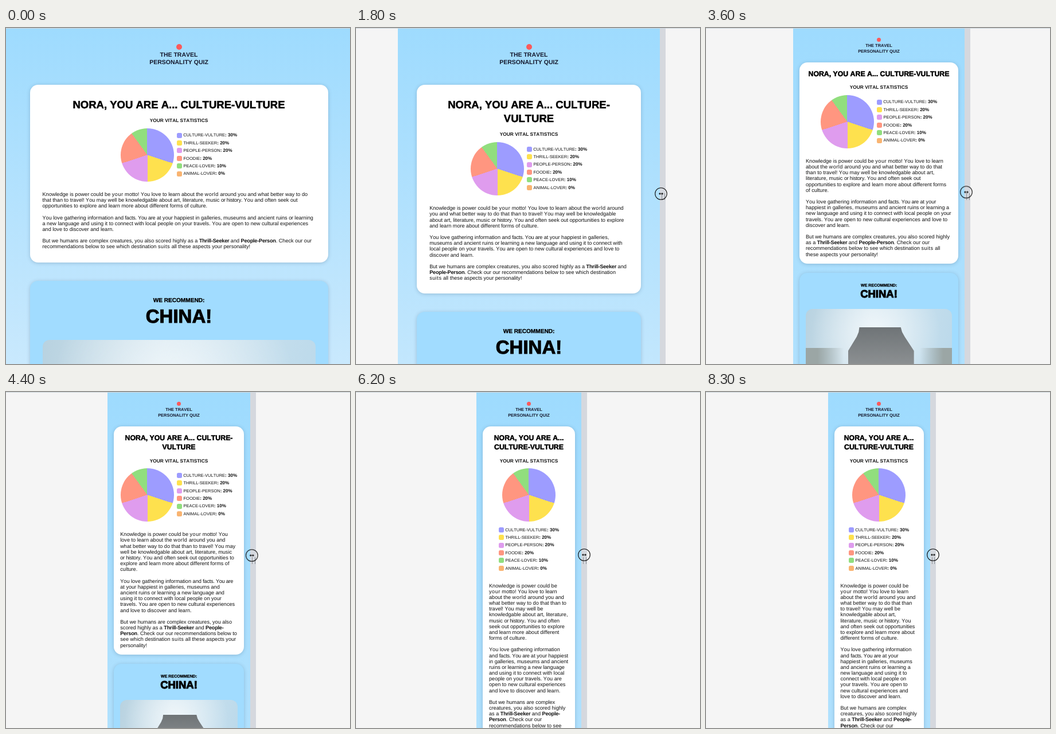
Write an HTML page that moves like this. It is 600 px wide and 586 px high and loops after 8.4 s.

```html
<!DOCTYPE html>
<html lang="en">
<head>
<meta charset="utf-8">
<title>Responsive quiz result</title>
<style>
* { box-sizing: border-box; margin: 0; padding: 0; }
html, body { width: 100%; height: 100%; overflow: hidden; background: #f5f5f5; }
body {
  position: relative;
  font: 9.15px/10.17px "Liberation Sans", Arial, sans-serif;
  font-kerning: none;
  text-rendering: geometricPrecision;
  color: #111;
}

/* Stage: the page is centred on x = 301.5 and resized from both sides */
.stage { position: absolute; left: -148.5px; top: 0; width: 900px; height: 586px; overflow: hidden; }
.topline { position: absolute; left: 0; top: 0; width: 100%; height: 1px; background: #ced6dc; }
.page {
  position: relative; height: 586px; margin: 0 auto;
  container-type: inline-size;
  animation: resize 8.4s infinite;
}
@keyframes resize {
  0%     { width: 700px;   animation-timing-function: steps(9); }
  10.7%  { width: 606px;   animation-timing-function: steps(9); }
  21.4%  { width: 456.6px; animation-timing-function: steps(11); }
  34.5%  { width: 350px;   animation-timing-function: steps(7); }
  42.85% { width: 299px;   animation-timing-function: steps(8); }
  52.35% { width: 248.5px; animation-timing-function: steps(8); }
  61.88% { width: 205.5px; animation-timing-function: steps(6); }
  69.03% { width: 190px;   animation-timing-function: steps(4); }
  73.8%  { width: 183px;   animation-timing-function: steps(10); }
  85.7%  { width: 179px;   animation-timing-function: steps(9); }
  96.4%, 100% { width: 178px; }
}

/* Narrow layout first */
.site {
  --margin: 11px; --pad: 11px; --pad-top: 11.8px; --gap: 16px; --fade: 1500px;
  --header: 60px; --dot: 7px; --dot-top: 16.5px; --logo: 7.45px; --logo-line: 9.4px; --logo-top: 26.3px;
  --title: 12.3px; --title-line: 16.4px;
  --intro: 7.1px; --intro-line: 22px; --intro-height: 18px;
  --place: 18.5px; --place-line: 16px; --place-height: 34px;
  height: 586px; overflow: hidden; padding: 0 var(--margin);
  background: linear-gradient(#9edbfe, #cdeafd var(--fade));
}
@container (min-width: 335px) {
  .site {
    --margin: 22px; --pad: 22px; --pad-top: 22.9px; --gap: 32px; --fade: 760px;
    --header: 99px; --dot: 10px; --dot-top: 28px; --logo: 10.5px; --logo-line: 13.2px; --logo-top: 41px;
    --title: 18.5px; --title-line: 24.3px;
    --intro: 10.1px; --intro-line: 26px; --intro-height: 26px;
    --place: 33px; --place-line: 28px; --place-height: 55px;
  }
}
@container (min-width: 415px) { .site { --margin: 33px; } }
@container (min-width: 554px) { .site { --margin: 44px; --fade: 640px; } }

header, h1, h2, h3, h4 { text-align: center; font-weight: bold; }
header {
  position: relative; height: var(--header); padding-top: var(--logo-top);
  font-size: var(--logo); line-height: var(--logo-line); color: #14182c; white-space: nowrap;
}
header::before {
  content: ""; position: absolute; left: calc(50% - var(--dot) / 2); top: var(--dot-top);
  width: var(--dot); height: var(--dot); border-radius: 50%; background: #fb5a5c;
}
.card {
  max-width: 520px; margin: 0 auto var(--gap); padding: var(--pad-top) var(--pad) var(--pad);
  border-radius: 14px; background: #fff; box-shadow: 0 1px 6px rgba(40, 70, 100, .25);
}
.sky { padding-top: var(--pad); background: #a1dcff; }

h1, h3, h4 { color: #000; -webkit-text-stroke: .5px #000; }
h1 { font-size: var(--title); line-height: var(--title-line); }
h2 { height: 28.7px; font-size: 8.35px; line-height: 30.6px; white-space: nowrap; }
h3 { height: var(--intro-height); font-size: var(--intro); line-height: var(--intro-line); -webkit-text-stroke-width: .3px; }
h4 { height: var(--place-height); font-size: var(--place); line-height: var(--place-line); -webkit-text-stroke-width: 1px; }

.stats { display: flex; flex-wrap: wrap; justify-content: center; align-items: center; gap: 7.3px 5px; margin-bottom: 17px; }
.pie {
  width: 93px; height: 93px; border-radius: 50%;
  background: conic-gradient(#9d9cff 30%, #fee14e 0 50%, #df9cee 0 70%, #ff9680 0 90%, #91de7e 0);
}
ul { width: 105px; padding-bottom: 1.6px; list-style: none; font-size: 7.5px; line-height: 13.4px; white-space: nowrap; }
li { display: flex; align-items: center; height: 13.4px; }
li::before { content: ""; width: 9px; height: 9px; margin-right: 2.5px; border-radius: 2.5px; background: var(--c); }
li b { font-size: 8px; white-space: pre; }

p { margin-bottom: 10.17px; }
p:last-child { margin-bottom: 0; }
p b { letter-spacing: -.22px; }
.loose { letter-spacing: .5px; }
.tight { letter-spacing: -.25px; }

.photo {
  position: relative; aspect-ratio: 3 / 2; overflow: hidden; border-radius: 12px;
  background:
    radial-gradient(ellipse at 48% 25%, rgba(246, 250, 252, .85), transparent 60%),
    linear-gradient(100deg, #b8d2e0, #d3e5ef 40%, #b9d8ea);
}
.photo::before, .photo::after { content: ""; position: absolute; }
.photo::before { left: 0; right: 0; top: 40%; bottom: 0; background: linear-gradient(90deg, #9ba6a5 8%, transparent 26% 78%, #9ba6a5 94%); }
.photo::after {
  left: 29%; top: 19%; width: 45%; height: 40%; background: linear-gradient(#6f7477, #8d9193);
  clip-path: polygon(17% 0, 80% 0, 82% 12%, 86% 24%, 100% 60%, 100% 100%, 0 100%, 0 60%, 13% 24%, 16% 12%);
}

/* Drag handle and pointer */
.handle { position: absolute; left: 100%; top: 0; width: 10px; height: 100%; background: #d5d8de; }
.handle::before {
  content: ""; position: absolute; left: 3.2px; top: 288px; width: 3.6px; height: 12px;
  border: solid #8d9197; border-width: 0 1px;
}
.pointer { position: absolute; left: 100%; top: 0; animation: drag 8.4s infinite steps(10); }
.pointer svg { position: absolute; left: -12px; top: -12px; width: 24px; height: 24px; }
@keyframes drag {
  0%, 21.4% { transform: translate(2px, 289px); }
  34.5%  { transform: translate(3px, 287px); }
  52.35% { transform: translate(2.7px, 285px); }
  61.88% { transform: translate(5px, 284.5px); }
  73.8%, 100% { transform: translate(5px, 284px); }
}
</style>
</head>
<body>
<div class="stage">
  <div class="page">
    <div class="site">
      <header>THE TRAVEL<br>PERSONALITY QUIZ</header>
      <section class="card">
        <h1>NORA, YOU ARE A... CULTURE-VULTURE</h1>
        <h2>YOUR VITAL STATISTICS</h2>
        <div class="stats">
          <div class="pie"></div>
          <ul>
            <li style="--c:#9d9cff">CULTURE-VULTURE<b>: 30%</b></li>
            <li style="--c:#fee14e">THRILL-SEEKER<b>: 20%</b></li>
            <li style="--c:#df9cee">PEOPLE-PERSON<b>: 20%</b></li>
            <li style="--c:#ff9680">FOODIE<b>: 20%</b></li>
            <li style="--c:#91de7e">PEACE-LOVER<b>: 10%</b></li>
            <li style="--c:#f9b471">ANIMAL-LOVER<b>: 0%</b></li>
          </ul>
        </div>
        <p>Knowledge is power could be <span class="loose">your</span> motto! You love to learn about the <span class="loose">world</span> around you and what better way to do that than to travel! You may well be knowledgable about art, literature, music <span class="tight">or history.</span> You and often seek out opportunities to explore and learn more about different forms of culture.</p>
        <p>You love gathering information and <span class="tight">facts. You are</span> at your happiest in galleries, museums and ancient ruins <span class="tight">or</span> learning a new language and using it to connect with local people on your travels. You are open to new cultural experiences and love to discover and learn.</p>
        <p>But we humans are complex creatures, you also scored highly as a <b>Thrill-Seeker</b> and <b>People-Person</b>. Check our our recommendations below to see which destination <span class="loose">suits</span> all these aspects your personality!</p>
      </section>
      <section class="card sky">
        <h3>WE RECOMMEND:</h3>
        <h4>CHINA!</h4>
        <div class="photo"></div>
      </section>
    </div>
    <div class="handle"></div>
    <div class="pointer">
      <svg viewBox="-12 -12 24 24">
        <circle r="10.3" fill="none" stroke="#111" stroke-width="1.1"/>
        <path d="M-4 0L-1.5-2.2V-.6H1.5V-2.2L4 0L1.5 2.2V.6H-1.5V2.2Z" fill="#111"/>
      </svg>
    </div>
  </div>
  <div class="topline"></div>
</div>
</body>
</html>
```
